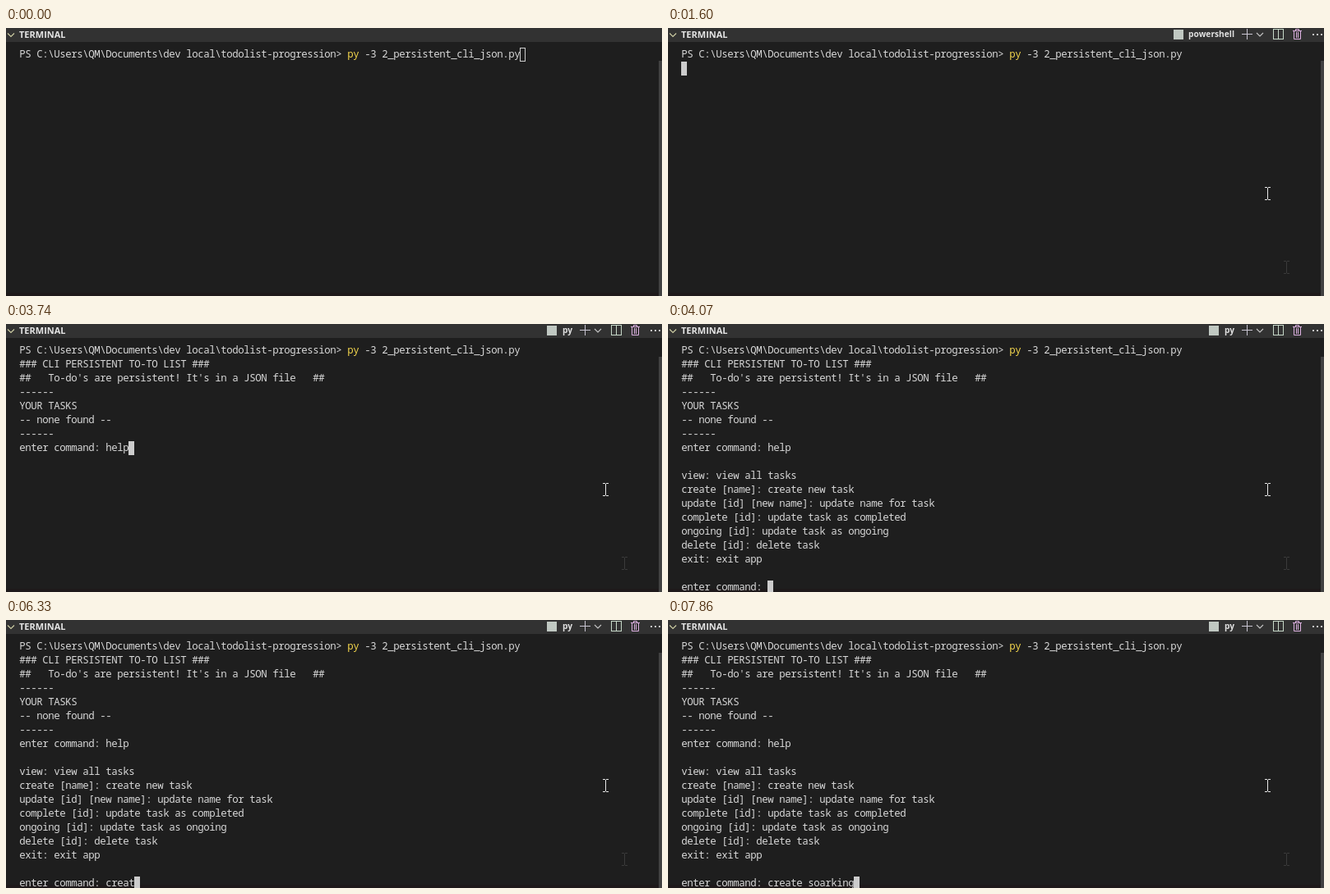
An HTML page with a canvas that plays this animation: 798x327 px, repeating every 7.99 s.

```html
<!DOCTYPE html>
<html lang="en">
<head>
<meta charset="utf-8">
<title>Terminal to-do list</title>
<style>
html, body { margin: 0; width: 100%; height: 100%; overflow: hidden; background: #1e1e1e; }
canvas { display: block; }
</style>
</head>
<body>
<canvas id="stage" width="798" height="327"></canvas>
<script>
const ctx = document.getElementById('stage').getContext('2d');
const LOOP = 7990, LEFT = 16, TOP = 24, CELL = 7, ROW = 17;
const MONO = '500 12.4px "Noto Sans Mono", monospace';
const TEXT = '#d8d8d8';

const PROMPT = 'PS C:\\Users\\QM\\Documents\\dev local\\todolist-progression> ';
const COMMAND = 'py -3 2_persistent_cli_json.py';
const ASK = 'enter command: ';
const INTRO = [
  '### CLI PERSISTENT TO-TO LIST ###',
  "##   To-do's are persistent! It's in a JSON file   ##",
  '------', 'YOUR TASKS', '-- none found --', '------'
];
const HELP = [
  '', 'view: view all tasks', 'create [name]: create new task',
  'update [id] [new name]: update name for task',
  'complete [id]: update task as completed',
  'ongoing [id]: update task as ongoing',
  'delete [id]: delete task', 'exit: exit app', ''
];
const HELP_KEYS = [3340, 3440, 3540, 3740];
const CREATE_KEYS = [5720, 6000, 6050, 6200, 6330, 6450, 6600,
  7000, 7120, 7240, 7350, 7460, 7660, 7760, 7860];

function rect(x, y, w, h, color) {
  ctx.fillStyle = color;
  ctx.fillRect(x, y, w, h);
}

function label(text, x, y, font, color, align = 'left') {
  ctx.font = font;
  ctx.fillStyle = color;
  ctx.textAlign = align;
  ctx.fillText(text, x, y);
}

function line(points, color, width = 1) {
  ctx.beginPath();
  points.forEach(([x, y], i) => i ? ctx.lineTo(x, y) : ctx.moveTo(x, y));
  ctx.strokeStyle = color;
  ctx.lineWidth = width;
  ctx.stroke();
}

// One glyph per terminal cell.
function write(text, col, row, color = TEXT) {
  [...text].forEach((glyph, i) =>
    label(glyph, LEFT + (col + i) * CELL + 4, TOP + row * ROW + 12, MONO, color, 'center'));
}

function cursor(col, row, solid = true) {
  const x = LEFT + col * CELL, y = TOP + row * ROW;
  if (solid) return rect(x, y, CELL, ROW, '#cccccc');
  ctx.strokeStyle = '#cccccc';
  ctx.lineWidth = 1;
  ctx.strokeRect(x + 0.5, y + 0.5, CELL - 1, ROW - 1);
}

function typed(text, keys, t) {
  return text.slice(0, keys.filter(k => k <= t).length);
}

function iBeam(x, y, color) {
  rect(x, y - 7, 1, 14, color);
  for (const edge of [y - 8, y + 7]) {
    rect(x - 3, edge, 3, 1, color);
    rect(x + 1, edge, 3, 1, color);
  }
}

function chevron(x, y, size, color) {
  line([[x - size, y - size / 2], [x, y + size / 2], [x + size, y - size / 2]], color, 1.1);
}

function toolbar(name) {
  const font = '700 10.2px "Open Sans", sans-serif';
  label(name, 689, 11, font, '#e2e2e2', 'right');
  rect(name === 'py' ? 658 : 615, 2, 12, 12, '#c0c8c2');

  rect(698, 7, 13, 1, '#c9c5d2');
  rect(704, 1, 1, 13, '#c9c5d2');
  chevron(720, 8, 4, '#c5c5c5');

  const split = '#c6d8c8';
  ctx.strokeStyle = split;
  ctx.lineWidth = 1;
  ctx.strokeRect(736.5, 1.5, 12, 12);
  rect(742, 1, 1, 12, split);

  const bin = '#dcb0e0';
  rect(760, 3, 11, 1, bin);
  line([[763.5, 3], [763.5, 1.5], [767.5, 1.5], [767.5, 3]], bin);
  line([[761.5, 4], [761.5, 13.5], [769.5, 13.5], [769.5, 4]], bin);
  rect(764, 5, 1, 7, bin);
  rect(766, 5, 1, 7, bin);

  for (const x of [784, 789, 794]) rect(x, 7, 2, 2, '#c5c5c5');
}

function pointer(t) {
  const step = Math.min(6, Math.floor((t - 210) / 78));
  const p = 1 - (1 - step / 6) ** 2;
  iBeam(752, 292, '#3b3b3b');
  iBeam(Math.round(752 - 23 * p), Math.round(292 - 90 * p), '#e8e8e8');
}

function terminal(t) {
  write(PROMPT, 0, 0);
  write('py', PROMPT.length, 0, '#f2d54c');
  write(COMMAND.slice(2), PROMPT.length + 2, 0);
  if (t < 1600) return cursor(PROMPT.length + COMMAND.length, 0, t >= 1140);
  if (t < 1800) return cursor(0, 1);

  INTRO.forEach((text, i) => write(text, 0, i + 1));
  const first = ASK + typed('help', HELP_KEYS, t);
  write(first, 0, 7);
  if (t < 4070) return cursor(first.length, 7);

  HELP.forEach((text, i) => write(text, 0, i + 8));
  const second = ASK + typed('create soarking', CREATE_KEYS, t);
  write(second, 0, 17);
  cursor(second.length, 17);
}

function draw(t) {
  rect(0, 0, 798, 327, '#1e1e1e');
  rect(0, 0, 798, 17, '#323232');
  rect(0, 323, 794, 4, '#1e191a');
  rect(794, 40, 4, 287, '#414141');
  chevron(6, 8.5, 4, '#cfcfa4');
  label('TERMINAL', 16, 12, '700 11px "Open Sans", sans-serif', '#e4e4e4');
  terminal(t);
  if (t >= 210) {
    toolbar(t < 2740 ? 'powershell' : 'py');
    pointer(t);
  }
}

const start = performance.now();
function frame() {
  draw((performance.now() - start) % LOOP);
  requestAnimationFrame(frame);
}
frame();
</script>
</body>
</html>
```
